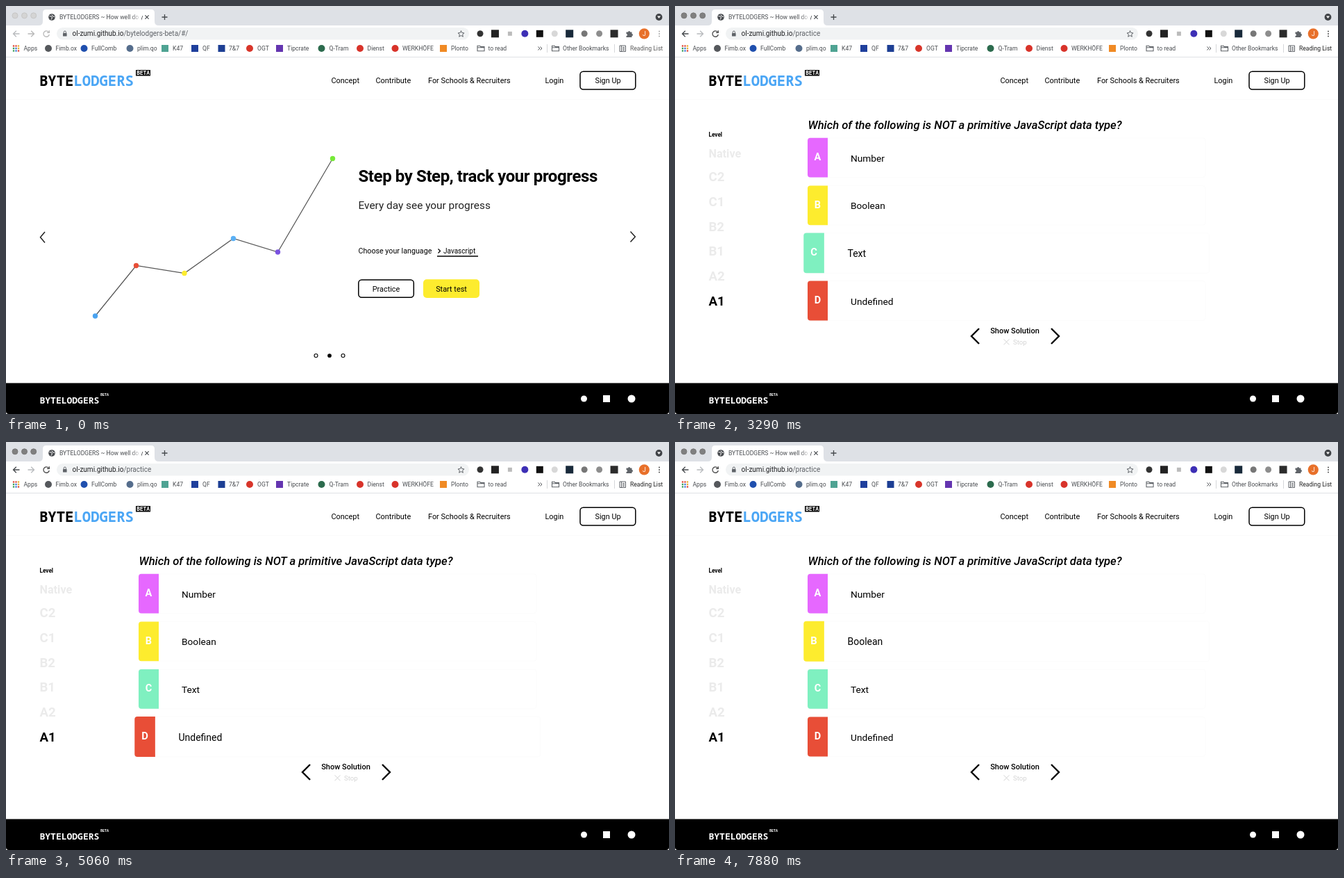
Animation, 955 px wide and 587 px high, one loop 8 s. Source, as an HTML page:

```html
<!DOCTYPE html>
<html lang="en">
<head>
<meta charset="utf-8">
<title>Quiz walkthrough</title>
<style>
  html, body { margin: 0; width: 100%; height: 100%; overflow: hidden; background: #fff; }
  svg { display: block; width: 955px; height: 587px; font-family: Roboto, sans-serif; }
  text { white-space: pre; }
  .mono { font-family: "Noto Sans Mono", monospace; font-weight: 800; }
  .ui { font-size: 8.6px; fill: #4a4d51; }
  .body { font-size: 10.9px; }
  .line { fill: none; stroke: #000; }
  .mid { text-anchor: middle; }
</style>
</head>
<body>
<svg viewBox="0 0 955 587">
  <defs>
    <linearGradient id="fade">
      <stop offset="0" stop-color="#fff" stop-opacity="0"/>
      <stop offset="1" stop-color="#fff"/>
    </linearGradient>
    <g id="folder" fill="none" stroke="#5f6368" stroke-width="1.1">
      <path d="M-5-3.8h3.6l1.2 1.4h5.2v6.2h-10zM-5-1.2h10"/>
    </g>
  </defs>

  <!-- tab strip -->
  <rect width="955" height="28" fill="#dee1e6"/>
  <path d="M47 28q6 0 6-6V10q0-5 5-5H209q5 0 5 5V22q0 6 6 6z" fill="#fff"/>
  <g id="lights"></g>
  <circle cx="66" cy="16" r="4.8" fill="#484b4f"/>
  <path d="M62.5 14.5l3 .5 1 2-1.5 2.5M66 12.5l1 2 3 1" class="line" style="stroke:#fff"/>
  <text x="77" y="19" class="ui">BYTELODGERS ~ How well do y</text>
  <rect x="180" y="8" width="15" height="16" fill="url(#fade)"/>
  <path d="M200.4 13.4l5.2 5.2m0-5.2l-5.2 5.2" class="line" style="stroke:#45494d" stroke-width="1.2"/>
  <path d="M224.5 16h8m-4-4v8" class="line" style="stroke:#45494d" stroke-width="1.3"/>
  <circle cx="940.5" cy="16" r="4.9" fill="#404347"/>
  <path d="M938 14.6h5l-2.5 3.2z" fill="#fff"/>

  <!-- toolbar -->
  <rect y="28" width="955" height="45" fill="#fff"/>
  <rect x="73" y="31" width="594" height="17.5" rx="8.75" fill="#f1f3f4"/>
  <g class="line" stroke-width="1.3">
    <path id="back" d="M19.5 40H10.5m4.3-4.3L10.5 40l4.3 4.3"/>
    <path id="forward" d="M31.5 40h9m-4.3-4.3l4.3 4.3-4.3 4.3"/>
    <path id="reload" d="M61.3 37.2a4.2 4.2 0 1 0 1 3.8M62.3 35.2v3.2h-3.2"/>
  </g>
  <rect x="82" y="39" width="5.6" height="4.6" rx=".7" fill="#5f6368"/>
  <path d="M83.2 39v-1.4a1.6 1.6 0 0 1 3.2 0V39" class="line" style="stroke:#5f6368"/>
  <text x="95.5" y="43.2" font-size="10" fill="#202124">ol-zumi.github.io<tspan id="path" fill="#5f6368"></tspan></text>
  <path d="M655.5 35.6l1.3 3 3.2.3-2.4 2.1.7 3.2-2.8-1.7-2.8 1.7.7-3.2-2.4-2.1 3.2-.3z" class="line" style="stroke:#5f6368"/>
  <g id="extensions"></g>
  <path d="M893.5 37.5h2.6a1.5 1.5 0 1 1 3 0h2.4v2.6a1.5 1.5 0 1 1 0 3v2h-8v-2.2a1.5 1.5 0 1 0 0-3z" fill="#5f6368"/>
  <circle cx="919.3" cy="39.8" r="7.6" fill="#e8702a"/>
  <text x="919.3" y="43" class="mid" font-size="8.6" fill="#fff">J</text>
  <g id="menu"><circle cx="941" cy="36.4" r="1"/><circle cx="941" cy="40" r="1"/><circle cx="941" cy="43.6" r="1"/></g>

  <!-- bookmarks -->
  <g id="bookmarks"></g>
  <use href="#folder" x="684" y="61"/>
  <use href="#folder" x="791.5" y="61"/>
  <path d="M779.5 55v12M876.5 55v12" class="line" style="stroke:#d5d7da"/>
  <path d="M766.5 58.500l2.300 2.500-2.300 2.500M769.500 58.500l2.300 2.500-2.300 2.500" class="line" style="stroke:#4a4d51"/>
  <g id="reading">
    <path d="M884 57h8.500v8.500h-8.500zM886.500 57v8.500M888 59.500h3M888 61.500h3M888 63.500h3" class="line" style="stroke:#5f6368"/>
    <text x="899" y="64" font-size="8.6">Reading List</text>
  </g>
  <path d="M0 73.500H955" class="line" style="stroke:#dfe1e5"/>

  <!-- site header -->
  <text x="48" y="115" class="mono" font-size="20.6">BYTE<tspan fill="#4ba6f5">LODGERS</tspan></text>
  <rect x="187" y="92" width="21" height="8.500"/>
  <text x="197.500" y="99" class="mono mid" font-size="8" fill="#fff">BETA</text>
  <g class="body">
    <text x="468.500" y="111">Concept</text>
    <text x="532.500" y="111">Contribute</text>
    <text x="608" y="111">For Schools &amp; Recruiters</text>
    <text x="776.500" y="111">Login</text>
    <text x="867" y="111" class="mid">Sign Up</text>
  </g>
  <rect x="827" y="94.200" width="79.800" height="25.800" rx="4.500" class="line" stroke-width="1.500"/>
  <path d="M0 134.500H955" class="line" style="stroke:#fafafa"/>

  <!-- landing page -->
  <g id="landing">
    <g id="chart"></g>
    <g class="line" style="stroke:#222" stroke-width="1.5">
      <path d="M56 325l-6.500 7.700 6.500 7.700M899.500 324.500l6.800 7.500-6.800 7.500"/>
    </g>
    <text x="507.500" y="253" font-size="24" font-weight="700" letter-spacing="-.4">Step by Step, track your progress</text>
    <text x="507.500" y="292.300" font-size="15.4" fill="#222">Every day see your progress</text>
    <text x="507.500" y="355.700" font-size="10.7">Choose your language</text>
    <path d="M622.500 349.500l3 3-3 3M621 360H680" class="line" stroke-width="1.3"/>
    <text x="630" y="355.700" font-size="10">Javascript</text>
    <rect id="practiceBox" x="507.800" y="393.900" width="79.500" height="25.400" rx="4.500" stroke-width="1.500"/>
    <text id="practiceText" x="547.500" y="410.700" class="body mid">Practice</text>
    <rect x="601" y="393.200" width="81" height="26.800" rx="5" fill="#fdec2e"/>
    <text x="641.500" y="410.700" class="body mid">Start test</text>
    <g class="line" stroke-width="1.1">
      <circle cx="446.500" cy="503" r="2.500"/>
      <circle cx="466" cy="503" r="2.300" fill="#000"/>
      <circle cx="485.500" cy="503" r="2.500"/>
    </g>
  </g>

  <!-- quiz page -->
  <g id="quiz">
    <text x="191.500" y="177" font-size="16.6" font-weight="500" font-style="italic">Which of the following is NOT a primitive JavaScript data type?</text>
    <text x="48.500" y="187.800" font-size="8.2" font-weight="700">Level</text>
    <g id="levels" font-weight="700"></g>
    <g id="options"></g>
    <path d="M438 464l-11 11 11 11" class="line" stroke-width="2.4"/>
    <path id="next" d="M542 464l11 11-11 11" class="line" stroke-width="2.4"/>
    <text x="489.500" y="470.700" class="mid" font-size="11" font-weight="500">Show Solution</text>
    <path d="M473.500 479.300l8 8m0-8l-8 8" class="line" style="stroke:#d4d4d4"/>
    <text x="487" y="486.600" font-size="9.6" fill="#d4d4d4">Stop</text>
  </g>

  <!-- footer -->
  <path d="M0 542.400H955V583q0 4-4 4H4q-4 0-4-4z"/>
  <text x="48.500" y="572" class="mono" font-size="13" fill="#fff">BYTELODGERS</text>
  <text x="136" y="561" class="mono" font-size="5" fill="#fff">BETA</text>
  <g fill="#fff">
    <circle cx="832.500" cy="565" r="4.500"/>
    <rect x="860" y="560" width="10" height="10"/>
    <circle cx="901" cy="565" r="5.500"/>
  </g>
</svg>

<script>
const $ = id => document.getElementById(id);
const fill = (id, items, draw) => { $(id).innerHTML = items.map(draw).join(''); };
const show = (id, on) => { $(id).style.display = on ? '' : 'none'; };
const badge = (x, y, r, color, square) => square
  ? `<rect x="${x - r}" y="${y - r}" width="${2 * r}" height="${2 * r}" fill="${color}"/>`
  : `<circle cx="${x}" cy="${y}" r="${r}" fill="${color}"/>`;

fill('lights', [13, 26.5, 39.7], x => `<circle cx="${x}" cy="13.800" r="4"/>`);

fill('extensions', [
  [4.5, '#333'], [5.5, '#222', 1], [3, '#bbb', 1], [5, '#3d2fb5'], [5, '#111', 1],
  [4.5, '#d8d8d8'], [5.5, '#18293a', 1], [4.5, '#777'], [4.5, '#8d8d8d'], [5.5, '#2b2b2b', 1]
], ([r, color, square], i) => badge(683 + i * 21.45, 39.8, r, color, square));

const bookmarks = [
  ['Fimb.ox', 61, 71.5, '#55585c'], ['FullComb', 112.5, 123, '#1f4fae'],
  ['plim.qo', 178.5, 189, '#556d8c'], ['K47', 229, 240, '#4fa393', 1],
  ['QF', 272, 283, '#1f3f9c', 1], ['7&amp;7', 310.5, 321, '#1d3f94', 1],
  ['OGT', 351, 362, '#d8352a'], ['Tipcrate', 394, 405, '#6435b0', 1],
  ['Q-Tram', 454.5, 465.5, '#2c6b4d'], ['Dienst', 510, 520.5, '#d8332a'],
  ['WERKHÖFE', 560.5, 571, '#d8332a'], ['Plonto', 630, 641, '#f08a24', 1]
];
const label = (text, x) => `<text x="${x}" y="64" class="ui">${text}</text>`;
fill('bookmarks', bookmarks, ([text, iconX, x, color, square]) =>
  badge(iconX, 61, 5, color, square) + label(text, x));
const gridColors = ['#e04a3a', '#e04a3a', '#e9b030', '#3c9f58', '#3f78d8', '#e9b030', '#3c9f58', '#3f78d8', '#e04a3a'];
$('bookmarks').innerHTML += label('Apps', 25.5) + label('to read', 694.5) + label('Other Bookmarks', 802) +
  gridColors.map((c, i) => badge(11 + i % 3 * 3.5, 57.5 + Math.floor(i / 3) * 3.5, 1.15, c, 1)).join('');

const points = [
  [128.5, 446, '#4aa3f0'], [187.5, 373.5, '#e84e37'], [257, 384.5, '#fdec2e'],
  [327.5, 334.5, '#5ab0f5'], [391.5, 354, '#7a52e0'], [470.5, 219.5, '#76ea38']
];
fill('chart', points, ([x, y, color]) => badge(x, y, 3.7, color));
$('chart').innerHTML = `<polyline points="${points.map(p => p.slice(0, 2))}" class="line"
  style="stroke:#555" stroke-width="1.2"/>` + $('chart').innerHTML;

fill('levels', ['Native', 'C2', 'C1', 'B2', 'B1', 'A2', 'A1'], (name, i) =>
  `<text x="48.500" y="${i ? 252.3 + (i - 1) * 35.7 : 217.7}" font-size="${i ? 18.6 : 16.2}"
    fill="${i < 6 ? '#ebebeb' : '#000'}">${name}</text>`);

const options = [
  ['A', 'Number', '#e668ff'], ['B', 'Boolean', '#fdec2e'],
  ['C', 'Text', '#7ff0c0'], ['D', 'Undefined', '#e84e37']
];
const rowCenter = i => 218.2 + i * 68.6;
fill('options', options, ([letter, answer, color], i) => {
  const y = rowCenter(i);
  return `<g id="option${letter}">
    <rect x="191" y="${y - 28.4}" width="573" height="56.800" rx="4" fill="#fff" stroke="#fcfcfc"/>
    <path d="M220 ${y - 28.4}h-25q-4 0-4 4v48.800q0 4 4 4h25z" fill="${color}"/>
    <text x="205.500" y="${y + 3.8}" class="mid" font-size="14.500" font-weight="700" fill="#fff">${letter}</text>
    <text x="253" y="${y + 5.6}" font-size="13.700">${answer}</text>
  </g>`;
});

const DURATION = 8000, HOVER_PRACTICE = 1940, OPEN_QUIZ = 2710;
// What the pointer rests on, from each time on
const hovers = [
  [2710, 'next'], [3290, 'C'], [3350, 'B'], [3410, ''], [3530, 'A'], [3760, ''],
  [4060, 'D'], [4120, ''], [4410, 'D'], [4530, 'C'], [4590, 'B'], [4650, 'A'],
  [5000, 'C'], [5060, 'D'], [5120, ''], [6410, 'next'], [6760, ''], [6820, 'D'],
  [6880, 'C'], [6940, ''], [7000, 'B'], [7240, ''], [7290, 'A'], [7410, ''],
  [7710, 'A'], [7880, 'B']
];

const scaleAt = (x, y, k) => `translate(${x} ${y}) scale(${k}) translate(${-x} ${-y})`;
const gray = (from, to, k) => { const v = from + (to - from) * k; return `rgb(${v},${v},${v})`; };

function render(t) {
  const focus = t < 1470 ? 0 : t < 1530 ? 0.5 : 1;
  const quiz = t >= OPEN_QUIZ;
  const pressed = t >= HOVER_PRACTICE;
  const hover = (hovers.findLast(([from]) => from <= t) || [0, ''])[1];

  $('lights').setAttribute('fill', gray(212, 128, focus));
  $('lights').setAttribute('stroke', gray(198, 120, focus));
  $('back').style.stroke = quiz ? '#45494d' : '#b8babd';
  $('forward').style.stroke = quiz ? '#b8babd' : gray(184, 72, focus);
  $('reload').style.stroke = gray(184, 72, focus);
  $('menu').setAttribute('fill', gray(170, 80, focus));
  $('reading').setAttribute('fill', gray(90, 32, focus));
  $('path').textContent = quiz ? '/practice' : '/bytelodgers-beta/#/';

  show('landing', !quiz);
  show('quiz', quiz);
  $('practiceBox').setAttribute('fill', pressed ? '#000' : '#fff');
  $('practiceBox').setAttribute('stroke', pressed ? '#c4c4c4' : '#000');
  $('practiceText').setAttribute('fill', pressed ? '#fff' : '#000');

  options.forEach(([letter], i) => $('option' + letter)
    .setAttribute('transform', scaleAt(477.5, rowCenter(i), hover === letter ? 1.02 : 1)));
  $('next').setAttribute('transform', scaleAt(547.7, 475, hover === 'next' ? 1.1 : 1));
}

const start = performance.now();
function tick() {
  render((performance.now() - start) % DURATION);
  requestAnimationFrame(tick);
}
tick();
</script>
</body>
</html>
```
